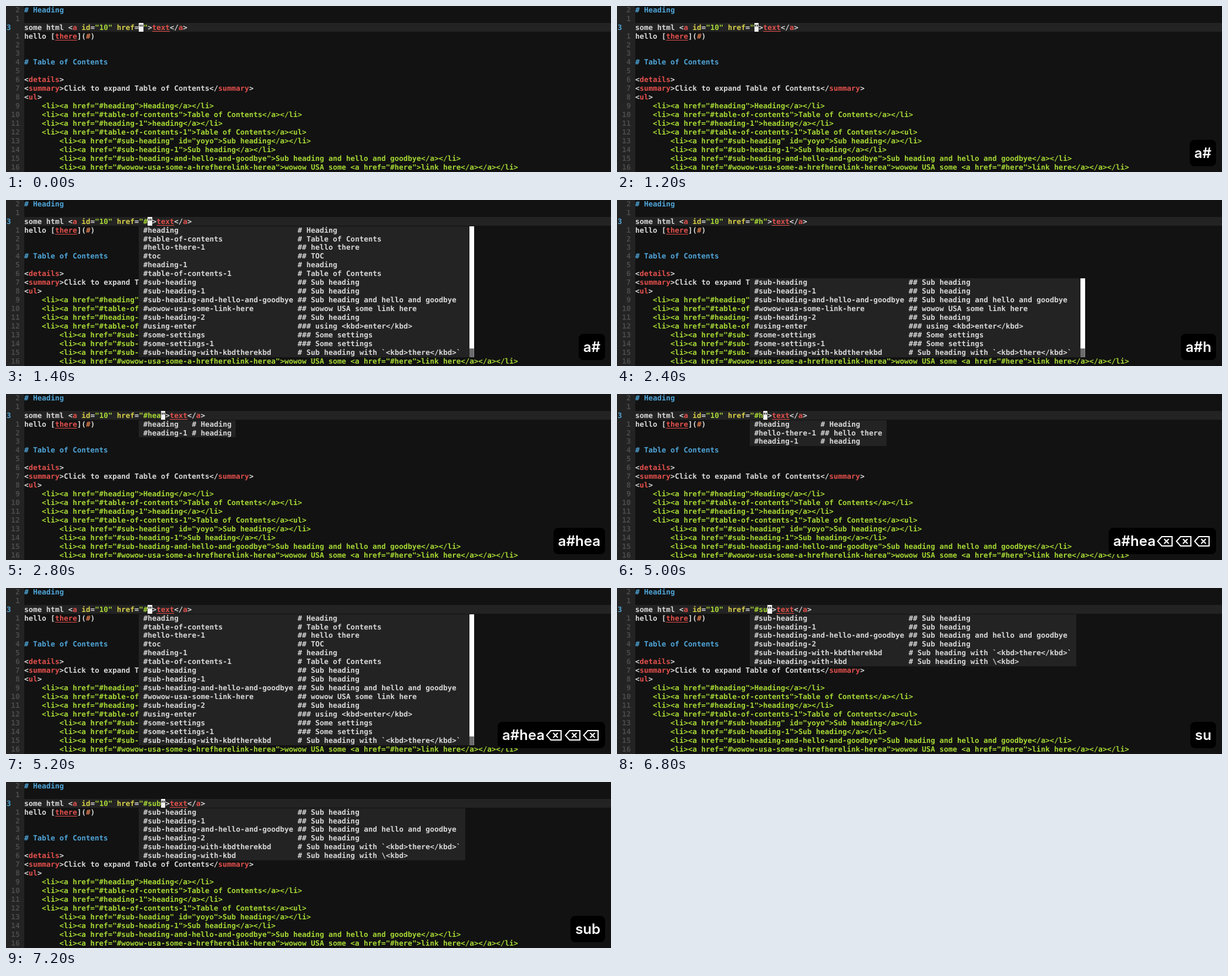
An HTML page for the animation above (8 s loop, 1030 px wide and 284 px high).

```html
<!DOCTYPE html>
<html lang="en">
<head>
<meta charset="utf-8">
<title>Link completion</title>
<style>
  :root { --row: 14.95px; --col: 7.512px; }
  html, body { margin: 0; width: 100%; height: 100%; overflow: hidden; background: #121212; }
  #stage { position: relative; width: 1030px; height: 284px; overflow: hidden; background: #121212; }
  #stage > * { position: absolute; }
  pre {
    margin: 0; color: #d8d8d8; white-space: pre;
    font: bold 12.478px/var(--row) "DejaVu Sans Mono", monospace;
    text-rendering: geometricPrecision; font-variant-ligatures: none;
  }
  i { font-style: normal; }
  .head { color: #4fa5d8; }
  .tag, .link { color: #e3504c; }
  .link { text-decoration: underline 1px; text-underline-offset: 2px; }
  .url { color: #dc7c50; }
  .attr { color: #d8cf48; }
  .str, .code { color: #a6d834; }
  .cursor { background: #f4f4f4; color: #121212; }
  #gutter { left: 0; top: 0; width: 31px; height: 284px; background: #232323; }
  #line { left: 0; top: 29.4px; width: 1030px; height: var(--row); background: #232323; }
  #numbers { left: 1px; top: -.3px; color: #4b4b4b; }
  #text { left: 31px; top: -.3px; }
  #popup { left: 226.3px; background: #232323; }
  #popup.full { padding-right: calc(2 * var(--col)); }
  #popup.full::after {
    content: ""; position: absolute; right: 0; top: 0; bottom: 0; width: var(--col);
    background: linear-gradient(#6c6c6c, #6c6c6c) bottom / 100% var(--row) no-repeat #fff;
  }
  #keys {
    right: 10px; top: 229px; height: 45px; padding: 0 8px; border-radius: 8px;
    background: #000; color: #fff; white-space: pre;
    font: 600 24px/45px Inter, sans-serif;
  }
  #keys svg { width: 31.7px; height: 20px; vertical-align: -1.5px; fill: none; stroke: #fff; stroke-width: 2; }
</style>
</head>
<body>
<div id="stage">
  <div id="gutter"></div>
  <div id="line"></div>
  <pre id="numbers"></pre>
  <pre id="text"></pre>
  <pre id="popup"></pre>
  <div id="keys"></div>
</div>
<script>
const LOOP = 8000, ROW = 14.95, MAX_ROWS = 15;
const $ = id => document.getElementById(id);
const esc = s => s.replace(/&/g, '&amp;').replace(/</g, '&lt;');
const tint = (cls, s) => `<i class="${cls}">${esc(s)}</i>`;
const tag = (name, attrs = '') =>
  name[0] === '/' ? '&lt;/' + tint('tag', name.slice(1)) + '>' : '&lt;' + tint('tag', name) + attrs + '>';

const item = (indent, id, label, tail = '</li>', attrs = '') =>
  tint('code', ' '.repeat(indent) + `<li><a href="#${id}"${attrs}>${label}</a>${tail}`);

const above = [tint('head', '# Heading'), ''];
const below = [
  `hello [${tint('link', 'there')}](${tint('url', '#')})`, '', '',
  tint('head', '# Table of Contents'), '',
  tag('details'),
  tag('summary') + 'Click to expand Table of Contents' + tag('/summary'),
  tag('ul'),
  item(4, 'heading', 'Heading'),
  item(4, 'table-of-contents', 'Table of Contents'),
  item(4, 'heading-1', 'heading'),
  item(4, 'table-of-contents-1', 'Table of Contents', '<ul>'),
  item(8, 'sub-heading', 'Sub heading', '</li>', ' id="yoyo"'),
  item(8, 'sub-heading-1', 'Sub heading'),
  item(8, 'sub-heading-and-hello-and-goodbye', 'Sub heading and hello and goodbye'),
  item(8, 'wowow-usa-some-a-hrefherelink-herea', 'wowow USA some <a href="#here">link here</a>'),
];

const anchors = [
  ['#heading', '# Heading'],
  ['#table-of-contents', '# Table of Contents'],
  ['#hello-there-1', '## hello there'],
  ['#toc', '## TOC'],
  ['#heading-1', '# heading'],
  ['#table-of-contents-1', '# Table of Contents'],
  ['#sub-heading', '## Sub heading'],
  ['#sub-heading-1', '## Sub heading'],
  ['#sub-heading-and-hello-and-goodbye', '## Sub heading and hello and goodbye'],
  ['#wowow-usa-some-link-here', '## wowow USA some link here'],
  ['#sub-heading-2', '## Sub heading'],
  ['#using-enter', '### using <kbd>enter</kbd>'],
  ['#some-settings', '### Some settings'],
  ['#some-settings-1', '### Some settings'],
  ['#sub-heading-with-kbdtherekbd', '# Sub heading with `<kbd>there</kbd>`'],
  ['#sub-heading-with-kbd', '# Sub heading with \\<kbd>'],
];

// redraw: the list is caught half cleared, with the cursor hidden
const steps = [
  { at: 0, link: '', keys: '', normal: true },
  { at: 1000, link: '', keys: 'a' },
  { at: 1200, link: '', keys: 'a#' },
  { at: 1400, link: '#', keys: 'a#' },
  { at: 2400, link: '#h', keys: 'a#h', redraw: true },
  { at: 2600, link: '#he', keys: 'a#he' },
  { at: 2800, link: '#hea', keys: 'a#hea' },
  { at: 3800, link: '#he', keys: 'a#hea⌫' },
  { at: 4200, link: '#h', keys: 'a#hea⌫⌫' },
  { at: 5000, link: '#h', keys: 'a#hea⌫⌫⌫' },
  { at: 5200, link: '#', keys: 'a#hea⌫⌫⌫' },
  { at: 6800, link: '#su', keys: 'su' },
  { at: 7000, link: '#su', keys: 'sub' },
  { at: 7200, link: '#sub', keys: 'sub' },
];

const backspace = '<svg viewBox="0 0 31.7 20"><path d="M3.5 10 10.5 2H28V18H10.5ZM14.5 6l8 8m0-8l-8 8"/></svg>';

function editedLine({ link, normal, redraw }) {
  const quoted = `"${link}"`;
  const pos = redraw ? -1 : normal ? 0 : quoted.length - 1;
  const value = pos < 0 ? tint('str', quoted)
    : tint('str', quoted.slice(0, pos)) + tint('cursor', quoted[pos]) + tint('str', quoted.slice(pos + 1));
  const attrs = ` ${tint('attr', 'id')}=${tint('str', '"10"')} ${tint('attr', 'href')}=${value}`;
  return 'some html ' + tag('a', attrs) + tint('link', 'text') + tag('/a');
}

function showPopup({ link, redraw }) {
  const popup = $('popup');
  popup.hidden = !link;
  if (!link) return;
  const found = anchors.filter(([id]) => redraw || id.startsWith(link));
  const idWidth = Math.max(...found.map(([id]) => id.length));
  const noteWidth = Math.max(...found.map(([, note]) => note.length));
  const hiddenRows = redraw ? 6 : 0;
  popup.className = found.length > MAX_ROWS ? 'full' : '';
  popup.style.top = (3 + hiddenRows) * ROW - .3 + 'px';
  popup.innerHTML = found.slice(hiddenRows, MAX_ROWS)
    .map(([id, note]) => esc(` ${id.padEnd(idWidth)} ${note.padEnd(noteWidth)} `)).join('\n');
}

function show(step) {
  $('text').innerHTML = [...above, editedLine(step), ...below].join('\n');
  showPopup(step);
  $('keys').hidden = !step.keys;
  $('keys').innerHTML = step.keys.replace(/⌫/g, backspace);
}

$('numbers').innerHTML = ['  2', '  1', tint('head', '3'),
  ...below.map((_, i) => String(i + 1).padStart(3))].join('\n');

let shown;
function frame() {
  const t = performance.now() % LOOP;
  const step = steps.findLast(s => s.at <= t);
  if (step !== shown) show(shown = step);
  requestAnimationFrame(frame);
}
frame();
</script>
</body>
</html>
```
